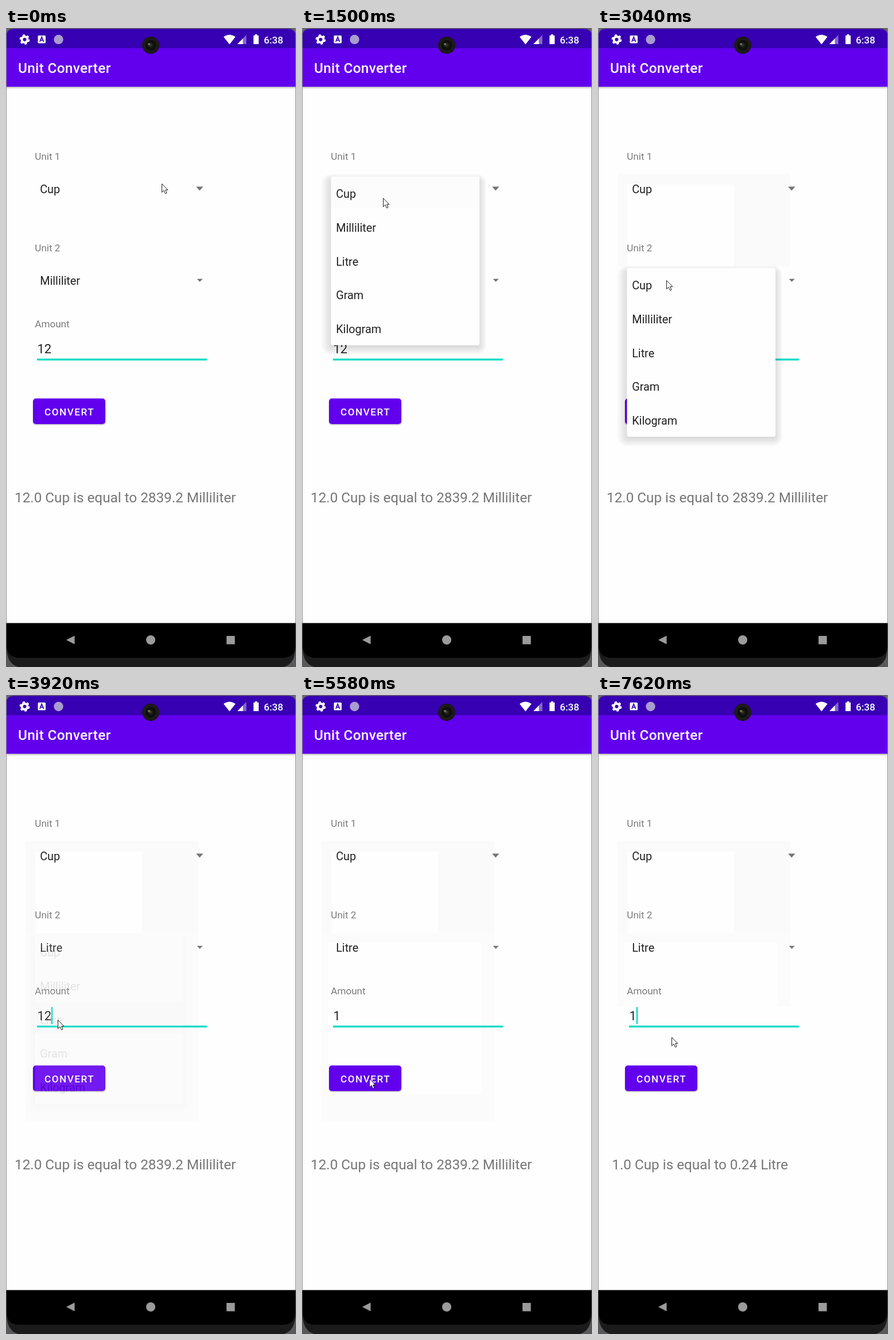
Recreate the animation shown at these times as an HTML page. Size 505 px wide and 1110 px high, loop 8000 ms.

```html
<!DOCTYPE html>
<html lang="en">
<head>
<meta charset="utf-8">
<title>Unit Converter</title>
<style>
  html, body { margin: 0; width: 100%; height: 100%; overflow: hidden; background: #fefefe; }
  svg { display: block; width: 100vw; height: 100vh; font-family: Roboto, sans-serif; }
  text { white-space: pre; }
  .title { font-size: 24.4px; font-weight: 500; letter-spacing: .0125em; fill: #fff; }
  .clock { font-size: 17.1px; font-weight: 500; fill: #fff; }
  .label { font-size: 17.1px; fill: #7b7b7b; }
  .item { font-size: 19.8px; fill: #212121; }
  .amount { font-size: 22px; fill: #212121; }
  .button { font-size: 17.1px; font-weight: 500; letter-spacing: .0893em; fill: #fff; }
  .result { font-size: 24.25px; fill: #767676; }
</style>
</head>
<body>
<svg viewBox="0 0 505 1110" preserveAspectRatio="none">
  <defs>
    <linearGradient id="drop" x2="0" y2="1">
      <stop stop-color="#000" stop-opacity=".28"/>
      <stop offset="1" stop-color="#000" stop-opacity="0"/>
    </linearGradient>
    <radialGradient id="lens">
      <stop stop-color="#3c3e31"/>
      <stop offset=".25" stop-color="#171714"/>
      <stop offset=".5" stop-color="#0b0b0b"/>
      <stop offset=".7" stop-color="#1f1d1b"/>
      <stop offset="1" stop-color="#191716"/>
    </radialGradient>
  </defs>
  <rect width="505" height="1110" fill="#fefefe"/>

  <!-- leftovers of closed menus -->
  <g id="trace1">
    <rect x="34" y="253" width="301" height="161" fill="#fafafa"/>
    <rect id="hole1" x="51" y="272" width="186" height="142" fill="#fefefe"/>
  </g>
  <g id="trace2">
    <rect id="area2" x="34" y="414" width="301" fill="#fbfbfb"/>
    <rect id="hole2" x="45" y="430" width="268" fill="#fefefe"/>
  </g>

  <!-- bars -->
  <rect y="102" width="505" height="4" fill="url(#drop)"/>
  <rect width="505" height="102" fill="#6200ee"/>
  <rect width="505" height="35" fill="#3700b3"/>
  <path d="M0 0H505V14Q504 1.500 491 1.500H14Q1 1.500 0 14Z" fill="#66656b"/>
  <text class="title" x="21" y="78">Unit Converter</text>
  <circle cx="32.5" cy="20" r="5" fill="none" stroke="#fff" stroke-width="4"/>
  <circle cx="32.5" cy="20" r="7.6" fill="none" stroke="#fff" stroke-width="2.6" stroke-dasharray="4 3.96"/>
  <rect x="55.5" y="13" width="13.5" height="13.5" rx="1.5" fill="#fff"/>
  <path d="M58.8 24 62.2 15.6 65.7 24M60 21.3H64.5" fill="none" stroke="#3700b3" stroke-width="1.7"/>
  <circle cx="91.5" cy="20" r="8.2" fill="#a99ccf"/>
  <path d="M379 15.5Q389 8 399.5 15.5L389.2 28.5Z" fill="#fff"/>
  <path d="M403 28H418.5V12Z" fill="#8567cf"/>
  <path d="M403 28H412.5V18.2Z" fill="#fff"/>
  <path d="M431 13H433.5V11H437.5V13H440V28H431Z" fill="#fff"/>
  <text class="clock" x="449" y="26.5">6:38</text>
  <circle cx="252" cy="30" r="15" fill="url(#lens)"/>
  <circle cx="249" cy="28" r="2" fill="#73775e"/>

  <!-- form -->
  <text class="label" x="50.3" y="229">Unit 1</text>
  <text class="label" x="50.3" y="388">Unit 2</text>
  <text class="label" x="50.3" y="519.5">Amount</text>
  <text class="item" x="59.2" y="286.5">Cup</text>
  <text class="item" x="59.2" y="445.5" id="unit2"></text>
  <path d="M331 275.5H343.5L337.2 282.5Z" fill="#757575"/>
  <path d="M332.5 435.7H342.5L337.5 441Z" fill="#757575"/>
  <text class="amount" x="54.5" y="565" id="amount"></text>
  <rect x="54" y="574.3" width="296" height="3.2" fill="#03dac5"/>
  <rect id="caret" y="542" width="2.4" height="29.5" fill="#03dac5"/>
  <rect x="46.5" y="645" width="127" height="45" rx="5" opacity=".18"/>
  <rect x="47" y="643.5" width="126" height="44.5" rx="5" fill="#6200ee"/>
  <rect id="ripple" x="47" y="643.5" width="126" height="44.5" rx="5" fill="#fff"/>
  <text class="button" x="67" y="672.5">CONVERT</text>
  <text class="result" y="824.2" id="result"></text>

  <g id="menu">
    <g id="shadow" fill-opacity=".025"></g>
    <rect x="50.5" y="258" width="258.5" height="293" rx="3" fill="#fefefe"/>
    <rect id="press" x="51" width="257.5" height="54"/>
    <g id="rows"></g>
  </g>

  <!-- navigation bar and bezel -->
  <path d="M.5 0V1034M504.5 0V1034" stroke="#8a8a8e"/>
  <rect y="1033.5" width="505" height="76.5" fill="#59595b"/>
  <path d="M1 1034H504V1078Q503 1104 484 1110H21Q2 1104 1 1078Z" fill="#1b1b1c"/>
  <path d="M1 1034H504V1074Q502 1094 482 1094H23Q3 1094 1 1074Z"/>
  <path d="M105 1063 119.5 1055.500V1070.5Z" fill="#9b9b9b"/>
  <circle cx="252" cy="1063" r="8" fill="#9b9b9b"/>
  <rect x="384" y="1056" width="14.5" height="14.5" fill="#9b9b9b"/>

  <path id="cursor" d="M.5 .7V15.4L4 12.2 6.5 17.8 9 16.7 6.6 11.3H10.8Z" fill="#fff" stroke="#1c1c1c" stroke-linejoin="round"/>
</svg>
<script>
const LOOP = 8000, TICK = 120, BLINK = 488;
const ROW = 58.6, MENU_GAP = 159;
const TYPED = 4690, PRESSED = 5820, CONVERTED = PRESSED + TICK;

const menus = [
  { open: 240, pick: 1770, row: 0 },
  { open: 2920, pick: 3680, row: 2 }
];

// the pointer's stops: when it leaves, how long it travels, where it arrives
const stops = [
  { at: 500, time: 840, x: 141, y: 295 },
  { at: 2130, time: 480, x: 119, y: 438 },
  { at: 3160, time: 360, x: 90, y: 564 },
  { at: 4290, time: 120, x: 155, y: 552 },
  { at: 5210, time: 360, x: 117, y: 666 },
  { at: 6300, time: 360, x: 168, y: 744 },
  { at: 6720, time: 240, x: 205, y: 462 },
  { at: 6990, time: 480, x: 128, y: 594 }
];

const $ = id => document.getElementById(id);
const set = (id, name, value) => $(id).setAttribute(name, value);
const show = (id, alpha) => set(id, 'opacity', Number(alpha));
const clamp = v => Math.max(0, Math.min(1, v));
const ticks = (t, from) => Math.floor((t - from) / TICK);

function add(parent, tag, attrs, text = '') {
  const el = document.createElementNS('http://www.w3.org/2000/svg', tag);
  for (const key in attrs) el.setAttribute(key, attrs[key]);
  el.textContent = text;
  $(parent).append(el);
}

function write(id, text) {
  if ($(id).textContent !== text) $(id).textContent = text;
}

for (let s = 1; s > 0; s -= .2) {
  add('shadow', 'rect', {
    x: 50 - 16 * s, y: 264 - 10 * s, width: 259 + 28 * s, height: 290 + 23 * s, rx: 3 + 13 * s
  });
}
['Cup', 'Milliliter', 'Litre', 'Gram', 'Kilogram'].forEach((name, i) =>
  add('rows', 'text', { class: 'item', x: 59.2, y: 295.3 + ROW * i }, name));

function menuAlpha({ open, pick }, t) {
  return t < pick ? clamp((ticks(t, open) + 1) / 2) : clamp(.9 - .4 * ticks(t, pick));
}

function pressAlpha({ pick }, t) {
  if (t < pick - 270) return 0;
  return t < pick - 150 ? .008 : .06;
}

// blinking restarts whenever the field regains focus or its text changes
function caretOn(t) {
  if (menus.some(m => t >= m.open && t < m.pick)) return false;
  const focus = [TICK, ...menus.map(m => m.pick + TICK), TYPED].filter(f => f <= t).pop();
  return focus !== undefined && Math.floor((t - focus) / BLINK) % 2 === 0;
}

function pointer(t) {
  let x = 271, y = 270;
  for (const stop of stops) {
    if (t < stop.at) break;
    const p = clamp((ticks(t, stop.at) + 1) * TICK / stop.time);
    const ease = p * p * (3 - 2 * p);
    x += (stop.x - x) * ease;
    y += (stop.y - y) * ease;
  }
  return [x, y];
}

function draw(t) {
  const [first, second] = menus;
  const index = t < second.open ? 0 : 1, menu = menus[index];
  const typed = t >= TYPED, converted = t >= CONVERTED;

  set('menu', 'transform', `translate(0 ${index * MENU_GAP})`);
  show('menu', menuAlpha(menu, t));
  set('press', 'y', 258 + menu.row * ROW);
  show('press', pressAlpha(menu, t));

  show('trace1', t >= first.pick);
  show('hole1', t >= first.pick + 3 * TICK);
  show('trace2', t >= second.pick);
  show('hole2', t >= second.pick + 3 * TICK);
  set('area2', 'height', converted ? 126 : 327);
  set('hole2', 'height', converted ? 110 : 263);

  show('ripple', clamp(.17 * Math.sin(Math.PI * clamp((ticks(t, PRESSED) + .8) / 5.8))));
  show('caret', caretOn(t));
  set('caret', 'x', typed ? 66.8 : 78.8);
  set('cursor', 'transform', `translate(${pointer(t)})`);

  write('unit2', t < second.pick ? 'Milliliter' : 'Litre');
  write('amount', typed ? '1' : '12');
  write('result', converted ? '1.0 Cup is equal to 0.24 Litre' : '12.0 Cup is equal to 2839.2 Milliliter');
  set('result', 'x', converted ? 24.3 : 15);
}

const began = performance.now();
function tick() {
  draw((performance.now() - began) % LOOP);
  requestAnimationFrame(tick);
}
tick();
</script>
</body>
</html>
```
